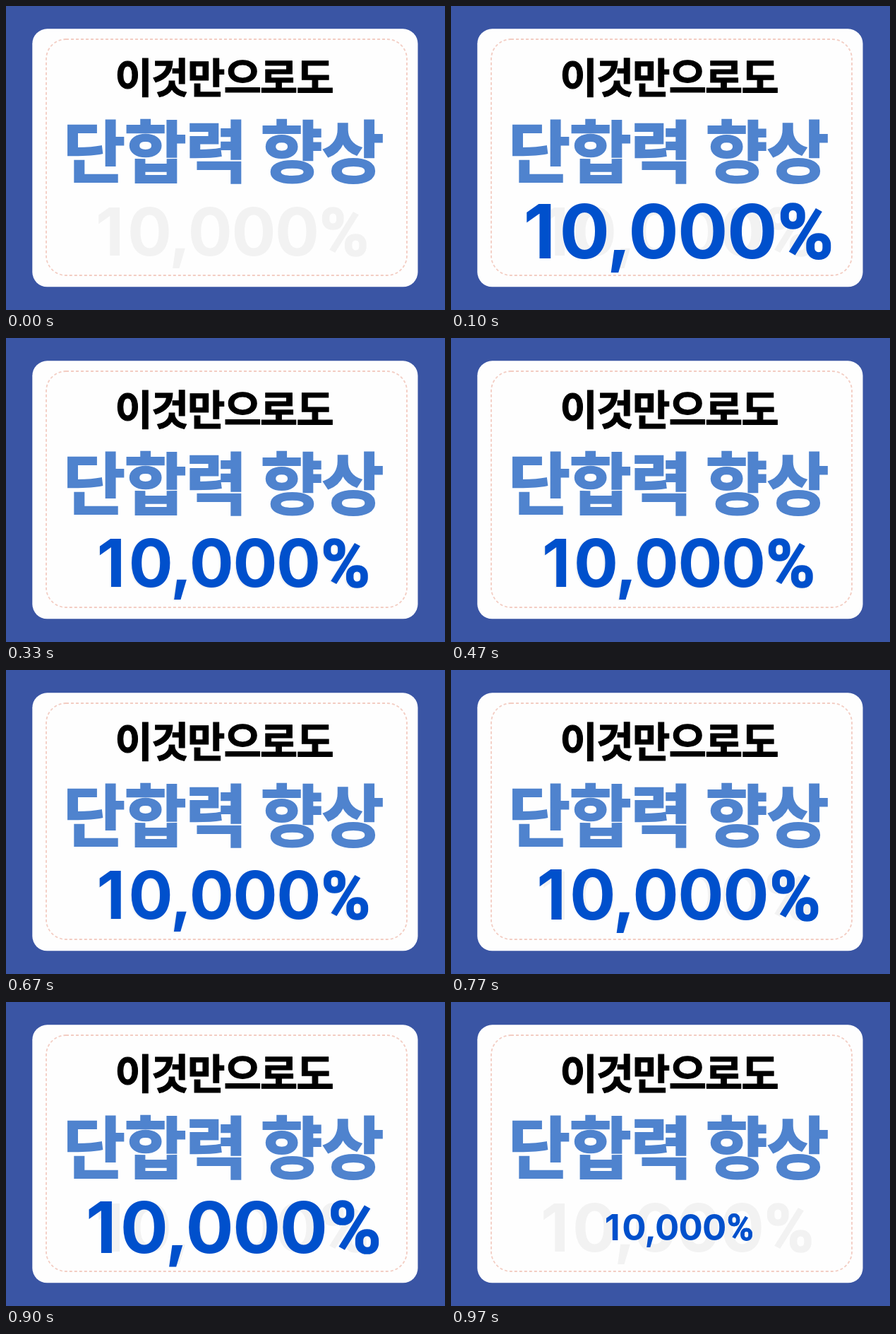
An HTML page that plays this animation: 622 by 430 pixels, repeating every 1010 ms.

```html
<!DOCTYPE html>
<html lang="ko">
<head>
<meta charset="utf-8">
<style>
html, body { margin: 0; width: 100%; height: 100%; overflow: hidden; background: #3a55a4; }
svg { display: block; }
text { white-space: pre; font-weight: 700; fill: currentColor; stroke: currentColor; stroke-width: 0; }
.ko { font-family: "Noto Sans CJK KR", "Noto Sans CJK", sans-serif; }
#lead { color: #000; stroke-width: 1.2; }
#head { color: #4f83ce; stroke-width: 2.2; word-spacing: -5.5px; }
#digits { font-family: Inter, sans-serif; }
#sign { font-family: Roboto, sans-serif; stroke-width: 1.6; }
#ghost { color: #f2f2f2; }
#pop { color: #0050cc; }
</style>
</head>
<body>
<svg width="622" height="430" viewBox="0 0 622 430">
  <rect x="37.3" y="32.3" width="546.2" height="365" rx="21" fill="#fefefe"/>
  <rect x="57" y="47" width="511" height="334" rx="28" fill="none" stroke="#f3cdc3" stroke-width="1.8" stroke-dasharray="4 3"/>
  <text id="lead" class="ko">이것만으로도</text>
  <text id="head" class="ko">단합력 향상</text>
  <use id="ghost" href="#amount" x="-2" y="0.5"/>
  <g id="pop">
    <g id="amount"><text id="digits">10,000</text><text id="sign">%</text></g>
  </g>
</svg>
<script>
const $ = id => document.getElementById(id);
const pen = document.createElement('canvas').getContext('2d');

// Size the type by its ink height, then track it across the line.
// `kern` is extra space after the first letter.
function place(id, left, right, top, bottom, { sample, kern = 0 } = {}) {
  const el = $(id), text = el.textContent, css = getComputedStyle(el);
  const edge = parseFloat(css.strokeWidth) / 2;
  const measure = (s, size) => {
    pen.font = `700 ${size}px ${css.fontFamily}`;
    return pen.measureText(s);
  };
  const ref = measure(sample || text, 100);
  const ascent = ref.actualBoundingBoxAscent;
  const size = 100 * (bottom - top - 2 * edge) / (ascent + ref.actualBoundingBoxDescent);
  const m = measure(text, size);
  const ink = m.actualBoundingBoxLeft + m.actualBoundingBoxRight + kern;
  const gaps = Math.max(1, text.length - 1);
  el.style.fontSize = size + 'px';
  el.style.letterSpacing = (right - left - 2 * edge - ink) / gaps + 'px';
  el.setAttribute('x', left + edge + m.actualBoundingBoxLeft);
  el.setAttribute('y', top + edge + ascent * size / 100);
  if (kern) el.setAttribute('dx', `0 ${kern}`);
}

place('lead', 157, 463, 73.5, 129.5);
place('head', 87, 535, 160, 253);
place('digits', 133, 442, 283, 353, { sample: '0', kern: 6 });
place('sign', 449.5, 515.5, 282.5, 354);

const LOOP = 1010, STEP = 100 / 3;

function scaleAt(t) {
  if (t < 560) return 1 - Math.exp(-0.02 * t) * Math.cos(Math.PI * t / 100);
  const x = Math.max(0, (t - 600) / 400);
  return Math.max(0, 1 + 0.56 * x ** 3 - 1.89 * x ** 8.7);
}

function draw(now) {
  const frame = Math.min(29, Math.floor((now % LOOP + 3.4) / STEP));
  const s = scaleAt(frame * STEP);
  $('pop').setAttribute('transform', `translate(324 318) scale(${s}) translate(-324 -318)`);
}

let start;
function tick(now) {
  start ??= now;
  draw(now - start);
  requestAnimationFrame(tick);
}
draw(0);
requestAnimationFrame(tick);
</script>
</body>
</html>
```
